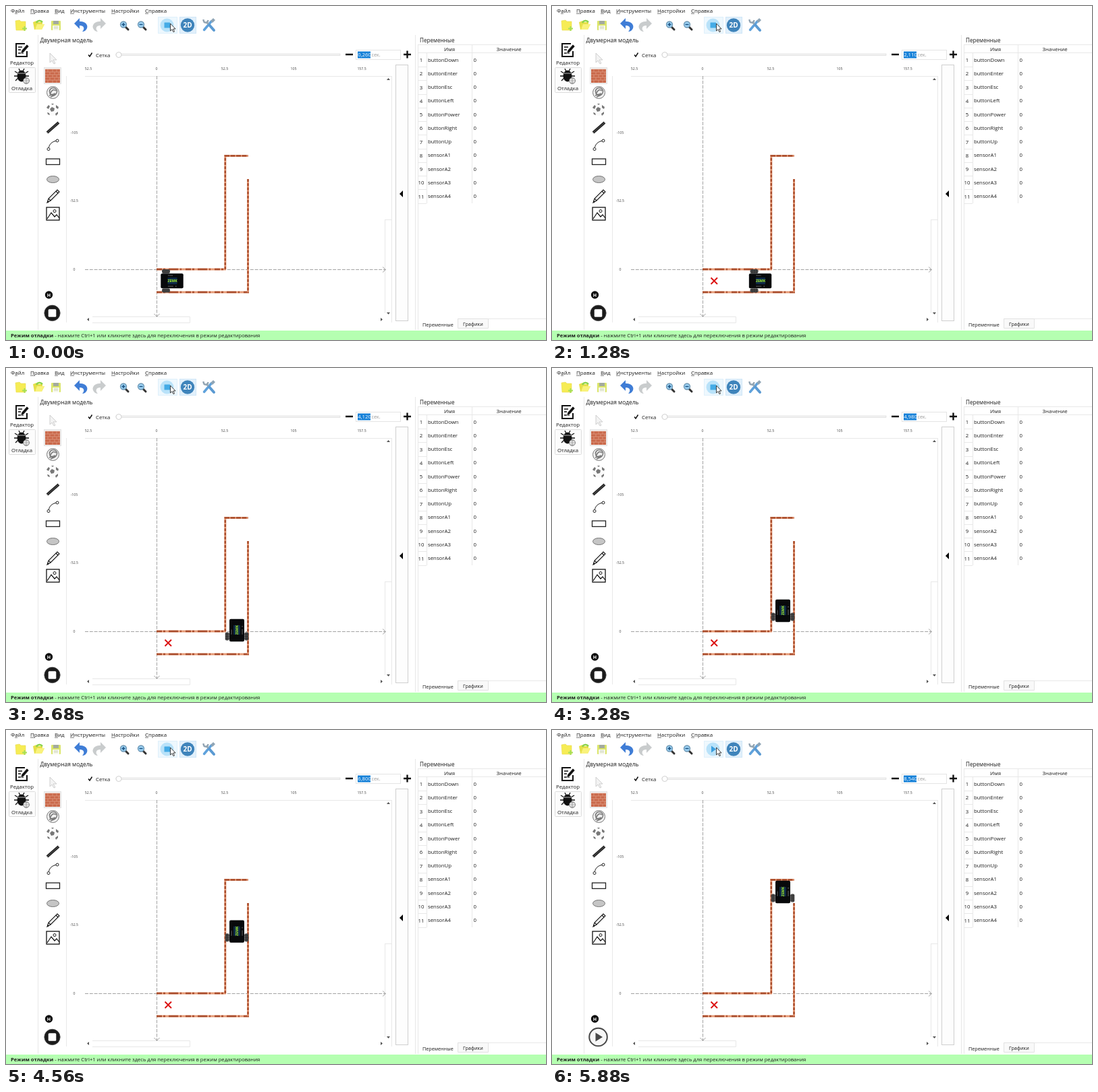
Write an HTML page that moves like this. It is 800 by 496 pixels and loops after 5.92 s.

```html
<!DOCTYPE html>
<html lang="ru">
<head>
<meta charset="utf-8">
<title>Двумерная модель</title>
<style>
html, body { margin: 0; width: 100%; height: 100%; overflow: hidden; background: #fff; }
svg { display: block; width: 800px; height: 496px; }
text { font-family: "Open Sans", "Noto Sans", sans-serif; font-size: 7.8px; fill: #1c1c1c; }
.axis { font-size: 5.2px; fill: #444; }
.mid { text-anchor: middle; }
.rule { stroke: #e8e8e8; fill: none; }
.ink { stroke: #111; fill: none; }
</style>
</head>
<body>
<svg viewBox="0 0 800 496">
  <!-- main toolbar -->
  <path d="M14 22l6-1 2 2h7v13H15z" fill="#f6ec55" stroke="#e8da48" stroke-width=".6"/>
  <path d="M27.500 30v7M24 33.500h7" stroke="#a5df58" stroke-width="2"/>
  <path d="M40 24l5-2 2 2h7v3h3l-4 8H42z" fill="#e6e04a"/>
  <path d="M43 35l3-8h11l-4 8z" fill="#f9f27c"/>
  <path d="M45 25c2-4 6-4 9-1" fill="none" stroke="#8bd34b" stroke-width="2.500"/>
  <rect x="67" y="22" width="14" height="14" rx="1" fill="#dbe56a"/>
  <rect x="70" y="22" width="8" height="5" fill="#a3aa9d"/>
  <rect x="69" y="29" width="10" height="7" fill="#f7f8ee"/>
  <path d="M71 31h6M71 33h6" stroke="#bcc2a4" stroke-width=".7"/>
  <path d="M101 26l8-8v5c8-1 13 5 11 10-1 3-4 5-7 5 4-4 3-9-4-9v5z" fill="#3f7dd6"/>
  <path d="M148 26l-8-8v5c-8-1-13 5-11 10 1 3 4 5 7 5-4-4-3-9 4-9v5z" fill="#c9cccd"/>
  <g id="zooms"></g>
  <rect x="225.500" y="16.500" width="28" height="24" fill="#eef8fe" stroke="#dff0fb"/>
  <circle cx="238.500" cy="28.500" r="10" fill="#b9e2f9"/>
  <rect class="run" x="234.500" y="24.500" width="8.500" height="8" rx=".5" fill="#45abe6"/>
  <path class="idle" d="M236 23.500l7 5-7 5z" fill="#3a9fdf"/>
  <rect x="257.500" y="16.500" width="24" height="24" fill="#e2f0fb" stroke="#cfe6f7"/>
  <circle cx="269" cy="28.500" r="10.200" fill="#3f84bb"/>
  <text class="mid" x="269" y="32.200" style="font-size:10px;font-weight:700;fill:#fff">2D</text>
  <path d="M293.500 35.500l11-13" stroke="#5fa2dc" stroke-width="3.500" stroke-linecap="round"/>
  <path d="M303 22l4-4 3 3-4 4z" fill="#8fa5b6"/>
  <path d="M297 24l4 4" stroke="#9aa9b5" stroke-width="3"/>
  <path d="M301 28l7 8" stroke="#5b9ad2" stroke-width="4" stroke-linecap="round"/>
  <path d="M292.500 20c0 6 6 6 7 1" fill="none" stroke="#93a5b3" stroke-width="2.500"/>
  <path d="M243.500 26v11l2.500-2.300 2 4 1.600-.8-1.900-3.900h3.400z" fill="#fff" stroke="#111" stroke-width=".8"/>

  <!-- mode switcher -->
  <g class="ink" stroke-width="2">
    <path d="M28 56H15v19h16v-8"/>
    <path d="M18 61h6M18 65h4M18 70h8" stroke-width="1.300"/>
  </g>
  <path d="M22 71l1-5 8-9 3 3-8 9z" fill="#111" stroke="#fff" stroke-width=".6"/>
  <rect x="4.500" y="91.500" width="39" height="37" rx="1" fill="#fcfcfc" stroke="#dcdcdc"/>
  <path class="ink" stroke-width="1.300" d="M13 97l5 3M12 104h5M14 111l4-4M33 97l-5 3M34 104h-5M19 93l2 4M27 93l-2 4"/>
  <ellipse cx="23" cy="104" rx="6.500" ry="8.500" fill="#111"/>
  <path d="M17 100h12" stroke="#fff" stroke-width=".7"/>
  <circle cx="30" cy="111" r="4.500" fill="#eee" stroke="#555" stroke-width=".7"/>
  <path d="M25.500 111h9M30 106.500v9M27 108h6M27 114h6" stroke="#666" stroke-width=".5"/>

  <!-- panel frames -->
  <path class="rule" d="M47.500 43V481M89.500 104V470M117 104.500H572M571.500 104V470M606.500 43V481"/>
  <path class="rule" d="M561.500 317.500h10M561.500 317V456M128 461.500h144.500v9H128"/>
  <rect x="577.500" y="87.500" width="18" height="380" fill="#fdfdfd" stroke="#cfcfcf"/>
  <path d="M588 274v10l-5-5z" fill="#000"/>
  <path d="M564 110h5l-2.500-3zM564 455h5l-2.500 3zM123 463v5l-3-2.500zM555 463v5l3-2.500z" fill="#555"/>

  <!-- scene controls -->
  <path class="ink" stroke-width="1.500" d="M122 72.500l2 2.500 3.500-5.500"/>
  <rect x="163" y="71" width="332" height="2.500" fill="#f3f3f3" stroke="#d8d8d8" stroke-width=".6"/>
  <circle cx="167" cy="72.500" r="4" fill="#fff" stroke="#c4c4c4" stroke-width=".8"/>
  <path class="ink" stroke-width="2.400" d="M503 72h11M589 72h11M594.500 66.500v11"/>
  <rect x="518.500" y="65.500" width="66" height="14" fill="#fff" stroke="#e4e4e4"/>
  <rect x="521" y="67.500" width="19" height="10" fill="#1681d8"/>
  <text id="clock" x="521.200" y="75.300" style="fill:#fff"></text>
  <text x="541.500" y="75.300" style="fill:#999;font-size:7.3px">сек.</text>

  <!-- palette -->
  <path d="M65 70v14l3-3 3 5 2-1-3-5h5z" fill="#f3f3f3" stroke="#c4c4c4" stroke-width=".8"/>
  <rect x="56.500" y="91.500" width="25" height="24" fill="#f3f3f3" stroke="#e2e2e2"/>
  <g id="bricks"></g>
  <g fill="none" stroke="#777">
    <circle cx="69.500" cy="128.500" r="9" fill="#f0f0f0"/>
    <circle cx="70" cy="127" r="5.500" stroke-width="1.500"/>
    <path d="M65 131c3-7 6-8 9-5M64 133l9-3M66 135l7-3" stroke-width="1.500"/>
  </g>
  <circle cx="69" cy="154" r="9" fill="#fafafa"/>
  <path d="M65 153l3-3 4 2-1 4-4 1zM60 151l3-4 2 2-2 4zM74 147l4 3-1 3-3-2zM61 158l3 1 1 3-3-1zM73 160l4-3v3l-3 3zM67 145h4l-2 2z" fill="#777"/>
  <path d="M61 188l17-15" stroke="#222" stroke-width="4"/>
  <path d="M61 188l17-15" stroke="#777" stroke-width=".7"/>
  <path class="ink" d="M63 212c1-7 5-11 13-12"/>
  <circle cx="63" cy="212.500" r="2" fill="#fff" stroke="#222"/>
  <circle cx="76" cy="200" r="2" fill="#fff" stroke="#222"/>
  <rect x="59.500" y="227" width="20" height="8.500" fill="#fff" stroke="#222" stroke-width="1.300"/>
  <ellipse cx="69.500" cy="257.500" rx="9" ry="5" fill="#c5c5c5" stroke="#777"/>
  <path class="ink" stroke-width="1.100" d="M61 292l2-6 13-13 3 3-13 13zM63 286l3 3M74 275l3 3"/>
  <path d="M61 292l1-3 2 2z" fill="#111"/>
  <rect class="ink" x="60" y="299" width="19" height="19" stroke-width="1.300"/>
  <path class="ink" stroke-width="1.200" d="M61 316l6-9 5 6 3-3 4 5"/>
  <circle class="ink" cx="72" cy="304.500" r="2"/>
  <circle cx="63.500" cy="429" r="5.700" fill="#0a0a0a"/>
  <text class="mid" x="63.500" y="431.500" style="font-size:7px;font-weight:700;fill:#fff">H</text>
  <g class="run">
    <circle cx="68.500" cy="456" r="11.700" fill="#1b1b1b" stroke="#555" stroke-width=".8"/>
    <rect x="62.700" y="450.200" width="11.600" height="11.600" rx="1.500" fill="#fff"/>
  </g>
  <g class="idle">
    <circle cx="68.500" cy="456" r="13.300" fill="#f6f6f6" stroke="#484848" stroke-width="2"/>
    <path d="M64.500 449.500l10.500 6.500-10.500 6.500z" fill="#484848"/>
  </g>

  <!-- scene -->
  <g fill="none" stroke="#999" stroke-width=".9">
    <path d="M223.500 104V461M117 391.500H562" stroke-dasharray="5 1.800"/>
    <path d="M219.500 457l4 4.500 4-4.500M558 387.500l4.500 4-4.500 4"/>
  </g>
  <g id="walls" fill="none"></g>
  <path d="M235.500 403.500l9.500 9.500M245 403.500l-9.500 9.500" stroke="#dc1414" stroke-width="2"/>
  <g id="robot">
    <rect x="-15" y="-17.300" width="12" height="6" rx="2" fill="#454545"/>
    <rect x="-15" y="11.300" width="12" height="6" rx="2" fill="#454545"/>
    <path d="M-12-17v5.500M-9-17v5.500M-6-17v5.500M-12 11.500v5.500M-9 11.500v5.500M-6 11.500v5.500" stroke="#292929" stroke-width=".7"/>
    <rect x="-16.700" y="-11" width="33.400" height="22" rx="2" fill="#08090b"/>
    <rect x="-6.500" y="-5" width="14" height="10" fill="#0e2947"/>
    <path d="M-6-8h7M-6 8h8M5 8h2" stroke="#555" stroke-width="1.500" stroke-dasharray="1.500 .5"/>
    <text class="mid" x=".5" y="1.900" style="font-size:5.2px;font-weight:700;fill:#a8f028">ZEMK</text>
  </g>

  <!-- variables -->
  <path class="rule" id="grid"/>
  <path class="rule" d="M610.500 464.500H800M610.500 57V481"/>
  <rect x="611" y="464" width="58" height="16" fill="#fff"/>
  <path d="M669.500 464.500h45v14h-45z" fill="#f9f9f9" stroke="#e2e2e2"/>
  <rect y="482" width="800" height="14" fill="#b5ffb1"/>
  <g id="labels"></g>
</svg>
<script>
const $ = id => document.getElementById(id);
const add = (id, markup) => $(id).insertAdjacentHTML('beforeend', markup);
const label = (s, x, y, attrs = '') => add('labels', `<text x="${x}" y="${y}" ${attrs}>${s}</text>`);
const size = px => `style="font-size:${px}px"`;

// text, left edge, mnemonic underline start and width
[['Файл', 7, 13, 4], ['Правка', 36, 36, 6], ['Вид', 72, 72, 5], ['Инструменты', 95, 95, 6],
 ['Настройки', 156, 156, 6], ['Справка', 206, 206, 5]].forEach(([s, x, ux, w]) => {
  label(s, x, 9.5, size(7.9));
  add('labels', `<path d="M${ux} 11.300h${w}" stroke="#444" stroke-width=".7"/>`);
});
label('Двумерная модель', 50.5, 53.5, size(8.4));
label('Сетка', 133, 75.5);
label('Редактор', 23.5, 86.5, 'class="mid"');
label('Отладка', 23.5, 125, 'class="mid"');
[['52.5', 122], ['0', 223], ['52.5', 324], ['105', 426], ['157.5', 527]]
  .forEach(([s, x]) => label(s, x, 95, 'class="axis mid"'));
[['-105', 190], ['-52.5', 291], ['0', 393]]
  .forEach(([s, y]) => label(s, 101, y, 'class="axis mid"'));

[[175, true], [201, false]].forEach(([x, plus]) => add('zooms',
  `<path d="M${x + 2} 31l4 4" stroke="#333" stroke-width="3" stroke-linecap="round"/>
   <circle cx="${x - 1}" cy="27.500" r="4.500" fill="#9bd0f2" stroke="#6a93b0" stroke-width="1.300"/>
   <path d="M${x - 3.500} 27.500h5${plus ? 'm-2.500-2.500v5' : ''}" stroke="#164c7d" stroke-width="1.400"/>`));

add('bricks', '<rect x="58" y="94" width="22" height="20" fill="#c9684a"/>');
for (let r = 0; r < 5; r++) {
  const y = 94 + r * 4, x = 62 + r % 2 * 3;
  add('bricks', `<path d="M58 ${y}h22M${x} ${y}v4M${x + 7} ${y}v4M${x + 13} ${y}v4" stroke="#dd9a80" stroke-width=".8"/>`);
}

const wall = (d, dash) => add('walls',
  `<path d="${d}" stroke="#e59a76" stroke-width="3"/>
   <path d="${d}" stroke="#a84c2c" stroke-width="2.400" stroke-dasharray="${dash}"/>`);
const across = '8 2 3 5 14 3 2 6', along = '4 2.200';
wall('M223 391H326', across);
wall('M223 425H360', across);
wall('M324.800 391V221', along);
wall('M324 222.500H358.500', '7 1.500');
wall('M358.500 257V426', along);

label('Переменные', 613, 53.5, size(8.1));
label('Имя', 657, 67, 'class="mid"');
label('Значение', 745, 67, 'class="mid"');
const names = ['Down', 'Enter', 'Esc', 'Left', 'Power', 'Right', 'Up'].map(s => 'button' + s)
  .concat([1, 2, 3, 4].map(n => 'sensorA' + n));
let grid = 'M610 57.500H800M610 69.500H800M623.500 70V293M690.500 57V293';
names.forEach((name, i) => {
  const y = 80 + i * 20.25;
  label(i + 1, 615, y + 3, 'class="mid"');
  label(name, 625, y + 2.5);
  label(0, 692.5, y + 2.5);
  grid += `M610 ${Math.round(y + 10) + .5}h13`;
});
$('grid').setAttribute('d', grid);
label('Переменные', 617, 475.5, size(7.2));
label('Графики', 677, 474.5, size(7.2));
label('<tspan font-weight="700">Режим отладки</tspan> - нажмите Ctrl+1 или кликните здесь для переключения в режим редактирования',
  7, 491.8, size(7.62));

const LOOP = 5920, TICK = 40, STOP = 5760;
// loop ms, model seconds
const clockSteps = [[0, .26], [1280, 2.11], [2080, 3.26], [3280, 4.98], [4040, 6.04], [5080, 7.56], [STOP, 8.54]];
// model seconds, x, y, heading
const poses = [[.26, 246, 408.3, 0], [3.1, 342, 408.3, 0], [3.24, 342, 408.3, -90],
  [3.56, 342, 408.3, -90], [8.54, 342, 240.5, -90]];

function sample(steps, t) {
  let i = 1;
  while (i < steps.length - 1 && t > steps[i][0]) i++;
  const [a, b] = [steps[i - 1], steps[i]];
  const k = Math.min(1, Math.max(0, (t - a[0]) / (b[0] - a[0])));
  return a.slice(1).map((v, j) => v + (b[j + 1] - v) * k);
}

function show(selector, on) {
  document.querySelectorAll(selector).forEach(el => el.style.display = on ? '' : 'none');
}

const start = performance.now();
function draw() {
  const t = Math.floor((performance.now() - start) % LOOP / TICK) * TICK;
  const [sec] = sample(clockSteps, t);
  const [x, y, angle] = sample(poses, sec);
  $('clock').textContent = (Math.round(sec * 100) / 100).toFixed(3).replace('.', ',');
  $('robot').setAttribute('transform', `translate(${x} ${y}) rotate(${angle})`);
  show('.run', t < STOP);
  show('.idle', t >= STOP);
  requestAnimationFrame(draw);
}
draw();
</script>
</body>
</html>
```
